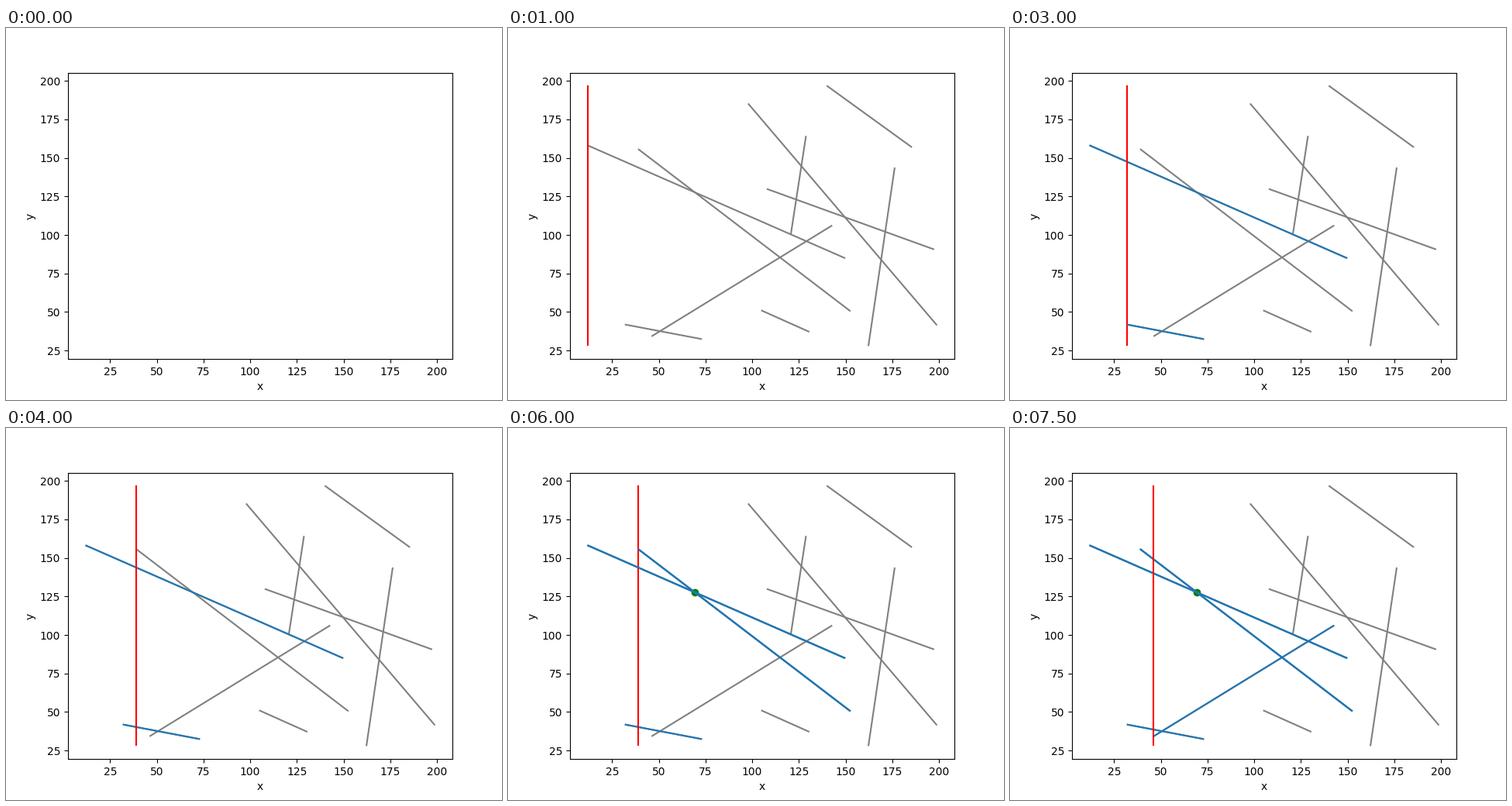
A matplotlib script that plays this animation: 640 by 480 pixels, repeating every 8000 ms.

```python
import numpy as np
import matplotlib.pyplot as plt
from matplotlib.animation import FuncAnimation
from matplotlib.collections import LineCollection

STEPS = 16
STEP_MS = 500

# Left and right endpoint of each segment, in sweep order.
segments = np.array([
    (11.8, 158.2, 149.8, 84.9), (31.8, 41.9, 73.1, 32.4),
    (38.9, 155.8, 152.6, 50.5), (46.1, 34.2, 142.8, 106.2),
    (97.8, 185.3, 198.9, 41.4), (104.8, 51.1, 130.6, 37.1),
    (107.8, 129.9, 197.4, 90.6), (120.7, 100.6, 128.8, 164.3),
    (139.9, 196.9, 185.5, 156.9), (162.2, 27.9, 176.3, 143.8),
]).reshape(-1, 2, 2)
y_min, y_max = segments[..., 1].min(), segments[..., 1].max()

fig, ax = plt.subplots(figsize=(6.4, 4.8), dpi=100)
ax.set(xlabel="x", ylabel="y")

layers = []  # (artist, first step, end step)


def lines(segs, color):
    return ax.add_collection(LineCollection(segs, colors=color))


def show(artist, start, end=STEPS):
    layers.append((artist, start, end))


def crossing(p, q):
    """Point where two segments meet, or None."""
    dp, dq = p[1] - p[0], q[1] - q[0]
    s, t = np.linalg.solve(np.column_stack([dp, -dq]), q[0] - p[0])
    return p[0] + s * dp if 0 <= s <= 1 and 0 <= t <= 1 else None


def plan_sweep():
    """Stop at each left endpoint, activate it and test it for crossings."""
    step = 2
    for i, seg in enumerate(segments):
        if step >= STEPS:
            break
        arrival, x = step, seg[0, 0]
        sweep = lines([[(x, y_min), (x, y_max)]], "red")
        show(lines([seg], "C0"), arrival + 1)
        step += 2
        for other in segments[:i]:
            hit = crossing(other, seg)
            if hit is None:
                continue
            show(lines([other, seg], "green"), step, step + 2)
            show(ax.scatter(*hit, color="green"), step + 1)
            show(lines([other, seg], "C0"), step + 2)
            step += 3
        show(sweep, arrival, step)
        step += 1


show(lines(segments, "gray"), 1)
ax.autoscale_view()
plan_sweep()


def draw(step):
    for artist, start, end in layers:
        artist.set_visible(start <= step < end)
    return [layer[0] for layer in layers]


anim = FuncAnimation(fig, draw, frames=STEPS, interval=STEP_MS,
                     repeat=True, repeat_delay=0, blit=False)
plt.show()
```
